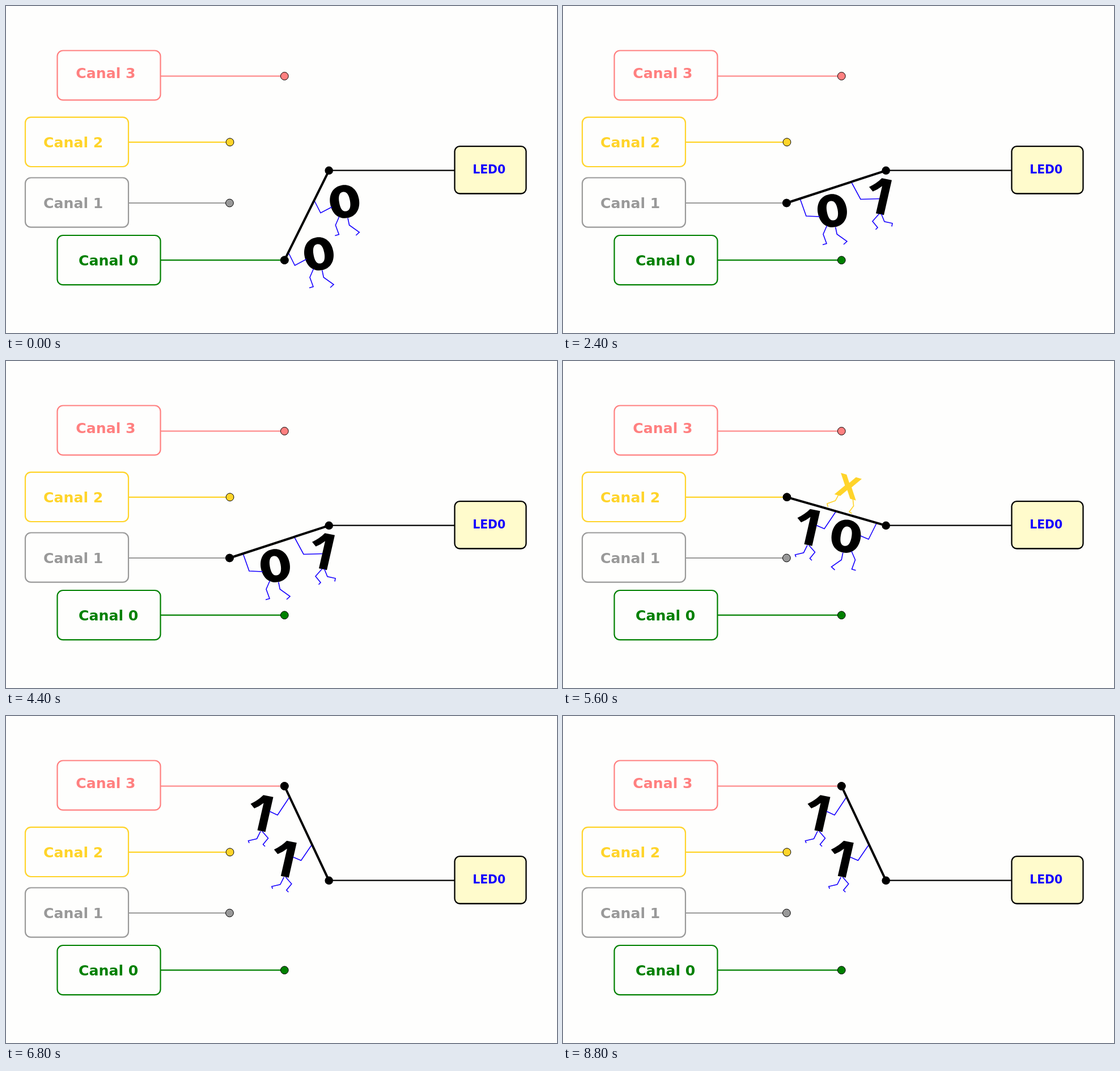
These frames come from a looping animation (972x576 px, 9.2 s). An HTML page:

```html
<!DOCTYPE html>
<html lang="es">
<head>
<meta charset="utf-8">
<title>Multiplexor</title>
<style>
  html, body { margin: 0; width: 100%; height: 100%; overflow: hidden; background: #fefefd; }
  svg { display: block; width: 100vw; height: 100vh; }
  text { font-family: "DejaVu Sans", Verdana, sans-serif; font-weight: bold; }
  .limb { fill: none; stroke: currentColor; stroke-width: 1.6; }
  .bit { color: #1600ff; }
  .bit path { fill: currentColor; }
  .show { visibility: hidden; animation: 9200ms step-end infinite; }
  .step1 { animation-name: step1; }
  .step5 { animation-name: step5; }
  .step6 { animation-name: step6; }
  @keyframes step1 { 0% { visibility: visible } 4.3478%, 100% { visibility: hidden } }
  @keyframes step5 { 0% { visibility: visible } 21.739%, 100% { visibility: hidden } }
  @keyframes step6 { 0% { visibility: visible } 26.0869%, 100% { visibility: hidden } }
</style>
</head>
<body>
<svg id="stage" viewBox="0 0 972 576" xmlns="http://www.w3.org/2000/svg">
  <defs>
    <g id="zero">
      <path fill-rule="evenodd" transform="rotate(-10)" d="M0-29.3C15.5-29.3 25.7-17.5 25.7 0S15.5 29.3 0 29.3S-25.7 17.5-25.7 0S-15.5-29.3 0-29.3Z
        M0-17.2C-6.5-17.2-9.6-11-9.6 0S-6.5 17.2 0 17.2S9.6 11 9.6 0S6.5-17.2 0-17.2Z"/>
      <polyline class="limb" points="-9.5,26.5 -16,41.5 -10,58 -17,60"/>
      <polyline class="limb" points="5.7,29 8.3,41.5 26,54 20,59.5"/>
    </g>
    <!-- origin at the top of the digit -->
    <path id="one" d="M0 0L17.5 3.5L3.5 65L-10.5 62L.5 14Q-7 20-16 23.5L-22.5 15.5Q-9 9 0 0Z"/>
    <g id="run">
      <polyline class="limb" points="-5,64 -11.5,77 -26.5,80.5 -25,84.5"/>
      <polyline class="limb" points="-2,64 8.5,76 -.5,87 3,90.5"/>
    </g>
    <g id="run2">
      <polyline class="limb" points="-5,63 -16.5,76 -7.5,87 -11,90.5"/>
      <polyline class="limb" points="-1,63 4.5,76.5 18.5,79.5 17.5,85"/>
    </g>
    <!-- origin between the feet -->
    <g id="walker">
      <text x="4.5" y="-25.5" font-size="54" text-anchor="middle" fill="currentColor">X</text>
      <polyline class="limb" points="-8,-26 -10.5,-15 -23,-6 -20,-1"/>
      <polyline class="limb" points="18.5,-26 23,-15 18.5,-3 23.5,-1.5"/>
    </g>
  </defs>
  <g id="channels" stroke-width="2.2"></g>
  <path d="M569.7 289.7H791.5" stroke="#000" stroke-width="2.2"/>
  <rect x="791.5" y="247.2" width="126" height="83.3" rx="9" fill="#fffbcc" stroke="#000" stroke-width="2.3"/>
  <text x="823.2" y="295" font-size="20.4" fill="#1600ff">LED0</text>
  <g id="scenes"></g>
  <circle cx="569.7" cy="289.8" r="7.3"/>
</svg>
<script>
  const STEP = 400;

  const use = (id, move) => `<use href="#${id}" transform="${move}"/>`;
  const at = (x, y) => `translate(${x} ${y})`;
  const arm = points => `<polyline class="limb" points="${points}"/>`;
  const zero = (x, y, hand, flip = '') => use('zero', at(x, y) + flip) + arm(hand);
  const one = (x, y, hand, legs = 'run') => use('one', at(x, y)) + use(legs, at(x, y)) + arm(hand);
  const show = (first, count, body) =>
    `<g class="show step${count}" style="animation-delay:${first * STEP}ms">${body}</g>`;

  // box: frame corner, dot: contact, label: text start
  // start, tilt, exit: walker poses; leap: right and top edge of the jump
  const channels = [
    { color: '#008000', box: [90.5, 404], dot: [491.3, 447.7], label: [128, 457], first: 0, count: 6,
      start: [358, 445], tilt: [501.5, 341, -63], exit: 690, leap: [847, 160],
      bits: zero(597.3, 344.5, '575,354 555,364.5 544,343') +
            zero(552, 436.5, '530,446 509.5,457 499,436') },
    { color: '#999999', box: [34, 302.5], dot: [394.4, 347], label: [66, 356], first: 6, count: 6,
      start: [291.5, 343], tilt: [484, 276, -18], exit: 688.5, leap: [871, 161],
      bits: zero(475, 360.5, '453,371 429,370 418,339') +
            one(562.5, 303.3, '558,339.5 525,340.5 508,309', 'run2') },
    { color: '#ffd42a', box: [34, 195.8], dot: [395, 239.8], label: [66, 249], first: 12, count: 5,
      start: [314.5, 237], tilt: [495.5, 231.7, 16], exit: 691, leap: [850, 163],
      bits: one(436, 260.7, '447,289.5 461,295.5 481.5,265') +
            zero(499.5, 308.7, '525,308 539,314 553,286', 'scale(-1 1)') },
    { color: '#ff8080', box: [90.5, 78.5], dot: [491.3, 123.5], label: [123.3, 127], first: 17, count: 6,
      start: [372.5, 119], tilt: [559.5, 184, 64], exit: 687, leap: [841, 162],
      bits: one(454, 139.2, '465,168 479,174.5 500,143') +
            one(495.3, 219.8, '506.5,248.5 520.5,254.5 540,226') }
  ];

  const channel = ({ color, box: [x, y], dot: [cx, cy], label: [tx, ty] }, i) => `
    <path d="M${x + 182} ${cy}H${cx}" stroke="${color}"/>
    <rect x="${x}" y="${y}" width="182" height="87.2" rx="10" fill="none" stroke="${color}"/>
    <circle cx="${cx}" cy="${cy}" r="6.9" fill="${color}" stroke="#000" stroke-width="1"/>
    <text x="${tx}" y="${ty}" font-size="25.2" fill="${color}">Canal ${i}</text>`;

  const scene = c => {
    const [cx, cy] = c.dot, [tx, ty, turn] = c.tilt, [right, top] = c.leap;
    const poses = [
      use('walker', at(...c.start)),
      use('walker', `${at(tx, ty)} rotate(${turn}) translate(0 33)`),
      use('walker', at(c.exit, 286)),
      `<path class="limb" d="M673 279Q692 200 ${right - 54} ${top + 32}"/>` +
        use('walker', at(right - 25, top + 66))
    ];
    const walk = poses.map((pose, i) => show(c.first + 1 + i, 1, pose)).join('');
    return show(c.first, c.count, `
      <g class="bit">${c.bits}</g>
      <path d="M569.7 289.8L${cx} ${cy}" stroke="#000" stroke-width="4"/>
      <circle cx="${cx}" cy="${cy}" r="7.3"/>`) + `<g color="${c.color}">${walk}</g>`;
  };

  document.getElementById('channels').innerHTML = channels.map(channel).join('');
  document.getElementById('scenes').innerHTML = channels.map(scene).join('');
</script>
</body>
</html>
```
